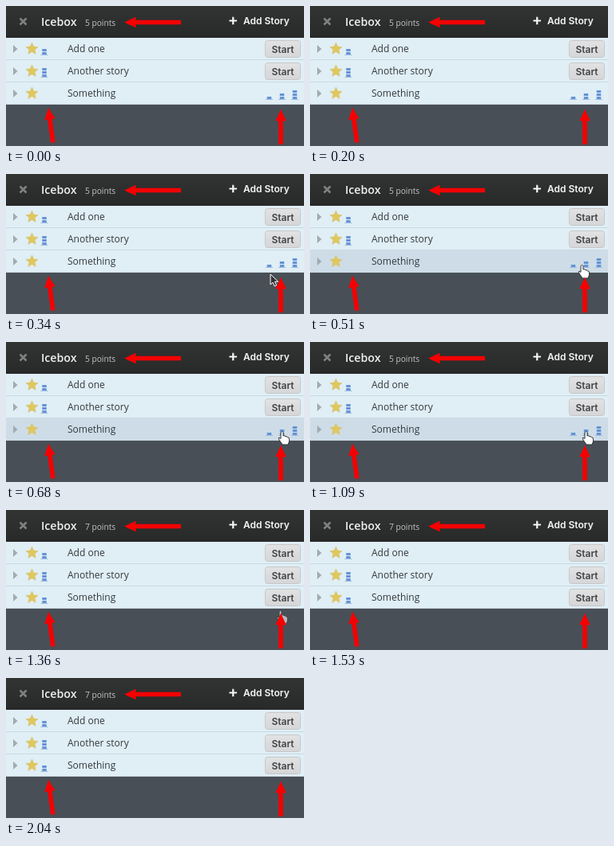
Recreate the animation shown at these times as an HTML page. Size 373 px wide and 176 px high, loop 2.38 s.

```html
<!DOCTYPE html>
<html lang="en">
<head>
<meta charset="utf-8">
<title>Estimating a story</title>
<style>
  html, body { margin: 0; width: 100%; height: 100%; overflow: hidden; background: #494f57; }
  svg { display: block; width: 373px; height: 176px; }
  text { font: 12px "Open Sans", sans-serif; fill: #33393d; }
  .title { font-size: 14.2px; font-weight: 600; fill: #f0f0f0; }
  .points { font-size: 10.2px; fill: #c4c4c4; }
  .add { font: 600 12px Inter, sans-serif; fill: #f6f6f6; }
  .start { font: 600 12px Inter, sans-serif; fill: #414345; text-anchor: middle; }
</style>
</head>
<body>
<svg viewBox="0 0 373 176">
  <defs>
    <linearGradient id="head" x2="0" y2="1"><stop stop-color="#323434"/><stop offset="1" stop-color="#282929"/></linearGradient>
    <linearGradient id="face" x2="0" y2="1"><stop stop-color="#e2e2e3"/><stop offset="1" stop-color="#d6d6d8"/></linearGradient>
  </defs>
  <rect width="373" height="40" fill="url(#head)"/>
  <path d="M17.500 15.500l8 8m0-8l-8 8" stroke="#808282" stroke-width="2.500"/>
  <text class="title" x="44" y="25">Icebox</text>
  <text class="points" id="points" x="99" y="25"></text>
  <path d="M279.500 18.500h9.500m-4.750-4.750v9.500" stroke="#f6f6f6" stroke-width="2.200"/>
  <text class="add" x="297" y="22.500">Add Story</text>
  <g id="rows"></g>
  <g id="pointer" fill="#333" stroke="#fff" stroke-linejoin="round">
    <path id="tip" d="M0 0V13L3 10.300L5.200 15L7.600 14L5.500 9.300H9.600Z"/>
    <path id="hand" d="M3 1.500Q4.500 -.5 6 1.500V6Q8 5 9 7Q11 6 11.500 8Q13.500 7.500 13.500 10V13L12 17H5L1 11Q-.5 8.500 1 8L3 9.500Z" fill="#fff" stroke="#333"/>
  </g>
  <g id="arrows" fill="#f60000"></g>
</svg>
<script>
const $ = id => document.getElementById(id);

function arrow(x, y, angle, length) {
  return `<path d="M0 0L6.800 14.500H2.800V${length}H-2.800V14.500H-6.800Z"
    transform="translate(${x} ${y}) rotate(${angle})"/>`;
}

function bars(x, base, count) {
  let out = `<path d="M${x - 4.5} ${base - .5}h9" stroke="#a3bde0"/>`;
  for (let i = 0; i < count; i++)
    out += `<rect x="${x - 2.75}" y="${base - 4 - i * 4}" width="5.500" height="3" fill="#6493d6"/>`;
  return out;
}

function star(x, y) {
  const points = Array.from({ length: 10 }, (_, i) => {
    const r = i % 2 ? 3.6 : 7.8, a = i * Math.PI / 5;
    return `${(x + r * Math.sin(a)).toFixed(2)},${(y - r * Math.cos(a)).toFixed(2)}`;
  });
  return `<polygon points="${points.join(' ')}" fill="#e0c85c" stroke="#d6bd5c" stroke-width=".6"/>`;
}

function button(y) {
  return `<rect x="324.500" y="${y - 10.5}" width="44" height="21" rx="3" fill="url(#face)" stroke="#c4c8ca"/>
    <text class="start" x="346.500" y="${y + 4.5}">Start</text>`;
}

function row(name, index, points, hover) {
  const top = 40 + 28 * index, y = top + 14;
  const estimate = [1, 2, 3].map(n => bars(313.5 + 16 * n, y + 8, n)).join('');
  return `<rect y="${top}" width="373" height="28" fill="${hover ? '#cddce7' : '#e0eef6'}"/>
    <path d="M0 ${top + 27.5}H373" stroke="#cbd9e2"/>
    <path d="M9 ${y - 5}l5.500 5l-5.500 5z" fill="#a1abb0"/>
    ${star(32.5, y)}
    ${points ? bars(48, y + 8, points) : ''}
    <text x="77" y="${y + 4}">${name}</text>
    ${points ? button(y) : estimate}`;
}

// Each scene: start time, pointer kind and place
const scenes = [
  [0], [340, 'tip', 331, 126], [510, 'hand', 336, 114],
  [680, 'hand', 341, 112], [1360, 'hand', 339, 126], [1530]
];
let shown;

function draw() {
  const t = performance.now() % 2380;
  const scene = scenes.findLast(s => s[0] <= t);
  if (scene !== shown) {
    shown = scene;
    const [start, kind, x = 0, y = 0] = scene;
    const done = start >= 1360;
    $('points').textContent = `${done ? 7 : 5} points`;
    $('rows').innerHTML = row('Add one', 0, 2) + row('Another story', 1, 3) +
      row('Something', 2, done ? 2 : 0, kind === 'hand' && !done);
    $('pointer').setAttribute('transform', `translate(${x} ${y})`);
    $('pointer').setAttribute('opacity', done ? .6 : 1);
    for (const id of ['tip', 'hand']) $(id).style.display = id === kind ? '' : 'none';
  }
  requestAnimationFrame(draw);
}

$('arrows').innerHTML = arrow(148, 20.5, -90, 71) + arrow(53, 128, -7.5, 44) + arrow(344, 130, 0, 44);
draw();
</script>
</body>
</html>
```
